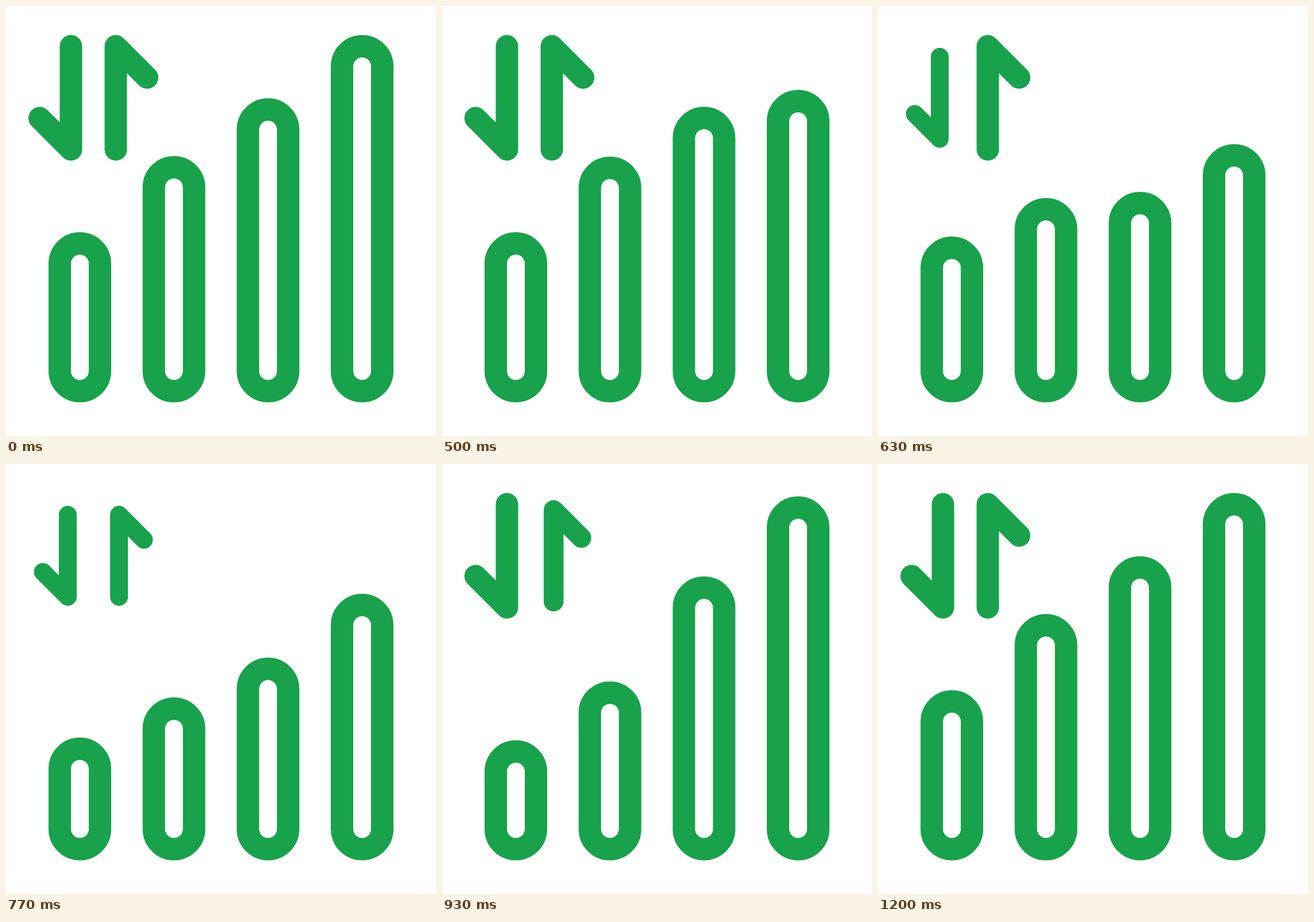
An HTML page for the animation above (1.5 s loop, 748 by 748 pixels).

```html
<!DOCTYPE html>
<html lang="en">
<head>
<meta charset="utf-8">
<title>Signal bars</title>
<style>
  html, body { margin: 0; width: 100%; height: 100%; overflow: hidden; background: #fff; }
  svg { display: block; width: 100%; height: 100%; }
</style>
</head>
<body>
<svg viewBox="0 0 748 748" fill="none" stroke="#18a24b" stroke-width="39"
     stroke-linecap="round" stroke-linejoin="round">
  <path d="M113 70V249.5L58.5 195"/>
  <path d="M191 249.5V70L245.5 124.5"/>
  <rect/><rect/><rect/><rect/>
</svg>
<script>
const LOOP = 1500, FPS = 30, BOTTOM = 670;

// Resting top, drop height and start tick of each bar, left to right.
const bars = [
  { top: 413, drop: 89.7, start: 16 },
  { top: 280.5, drop: 146, start: 14 },
  { top: 180, drop: 177.5, start: 12 },
  { top: 70, drop: 191, start: 10 }
];
const arrows = [
  { x: 85.8, y: 159.75, start: 15 },
  { x: 218.4, y: 159.75, start: 19 }
];
const rects = document.querySelectorAll('rect');
const paths = document.querySelectorAll('path');

// cubic-bezier(.77, 0, .23, 1), solved by bisection
function ease(x) {
  if (x <= 0) return 0;
  if (x >= 1) return 1;
  let lo = 0, hi = 1, s;
  for (let i = 0; i < 24; i++) {
    s = (lo + hi) / 2;
    const at = 3 * .77 * s * (1 - s) ** 2 + 3 * .23 * s * s * (1 - s) + s ** 3;
    if (at < x) lo = s; else hi = s;
  }
  return s * s * (3 - 2 * s);
}

// Rises 0 to 1 and falls back, each way lasting `half` ticks.
const pulse = (tick, start, half) => ease(1 - Math.abs(tick - start - half) / half);

rects.forEach((rect, i) => {
  rect.setAttribute('x', 93.5 + i * 163.67);
  rect.setAttribute('width', 70);
  rect.setAttribute('rx', 35);
});

function draw(now) {
  // Ticks begin on 10 ms marks, hence the small lead.
  const tick = Math.floor((now % LOOP + 4) * FPS / 1000);
  bars.forEach(({ top, drop, start }, i) => {
    const y = top + drop * pulse(tick, start, 10);
    rects[i].setAttribute('y', y);
    rects[i].setAttribute('height', BOTTOM - y);
  });
  arrows.forEach(({ x, y, start }, i) => {
    const scale = 1 - .23 * pulse(tick, start, 6);
    paths[i].setAttribute('transform',
      `translate(${x} ${y}) scale(${scale}) translate(${-x} ${-y})`);
  });
}

function loop() {
  draw(performance.now());
  requestAnimationFrame(loop);
}
loop();
</script>
</body>
</html>
```
